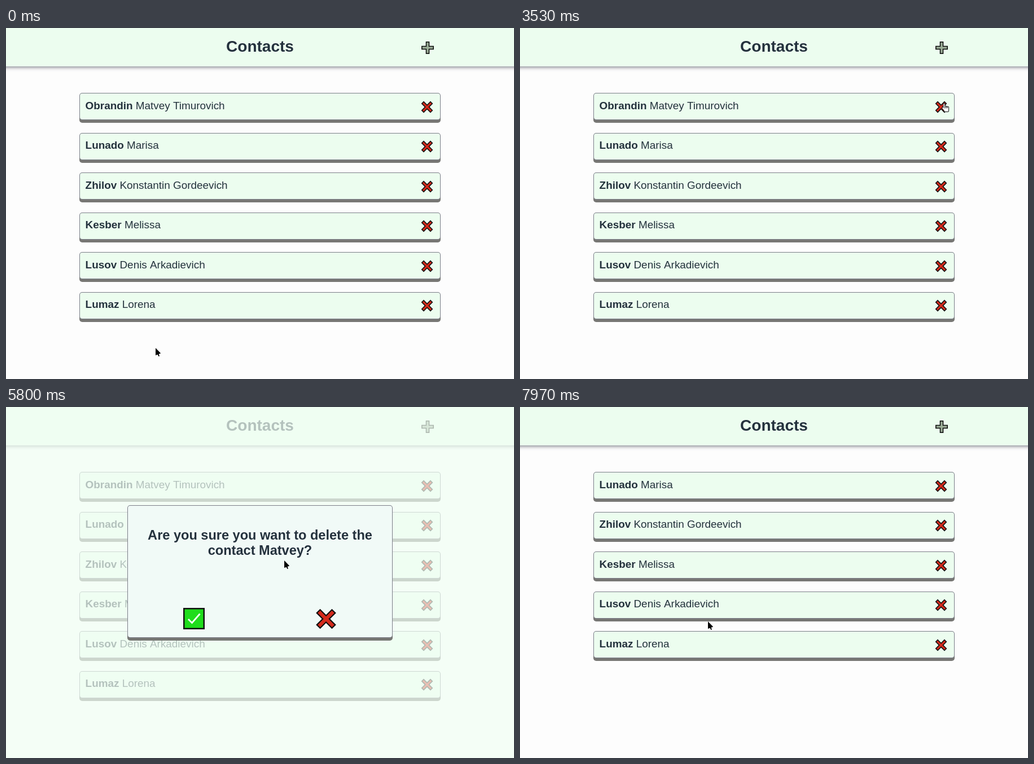
Write an HTML page with a canvas that moves like this. It is 900x622 px and loops after 8000 ms.

```html
<!DOCTYPE html>
<html lang="en">
<head>
<meta charset="utf-8">
<title>Contacts</title>
<style>
  html, body { margin: 0; width: 100%; height: 100%; overflow: hidden; background: #fdfdfd; }
  canvas { display: block; }
</style>
</head>
<body>
<canvas id="stage" width="900" height="622"></canvas>
<script>
const ctx = document.getElementById('stage').getContext('2d');
const W = 900, H = 622, LOOP = 8000, OPEN = 4450, CLOSE = 7100;
const INK = '#24313d', MINT = '#ecfdef', EDGE = '#7b7d88', SHADE = '#777774', RED = '#d42a1c';
const FONT = '"Liberation Sans", Arial, sans-serif';
const ROW = { x: 130, y: 115.2, w: 640, h: 53, pitch: 70.5 };
const DIALOG = { x: 215, y: 174, w: 470, h: 240 };

const contacts = [
  ['Obrandin', 'Matvey Timurovich'],
  ['Lunado', 'Marisa'],
  ['Zhilov', 'Konstantin Gordeevich'],
  ['Kesber', 'Melissa'],
  ['Lusov', 'Denis Arkadievich'],
  ['Lumaz', 'Lorena']
];

const home = { x: 265, y: 567 };
const moves = [
  { from: 1300, to: 2150, x: 489, y: 334 },
  { from: 2550, to: 3450, x: 749, y: 134 },
  { from: 4600, to: 5070, x: 632, y: 177 },
  { from: 5300, to: 6350, x: 333, y: 380 }
];

const rowTop = i => ROW.y + ROW.pitch * i;
const ease = p => p * p * (3 - 2 * p);

function pointerAt(t) {
  let { x, y } = home;
  for (const m of moves) {
    const p = ease(Math.min(1, Math.max(0, (t - m.from) / (m.to - m.from))));
    x += (m.x - x) * p;
    y += (m.y - y) * p;
  }
  return { x: Math.round(x), y: Math.round(y) };
}

function text(str, x, y, size, bold, align = 'left') {
  ctx.font = `${bold ? 'bold ' : ''}${size}px ${FONT}`;
  ctx.textAlign = align;
  ctx.fillStyle = INK;
  ctx.fillText(str, x, y);
  return ctx.measureText(str).width;
}

function box(x, y, w, h, r, fill) {
  ctx.beginPath();
  ctx.roundRect(x, y, w, h, r);
  ctx.fillStyle = fill;
  ctx.fill();
}

// Bordered box with a solid shadow below
function panel(x, y, w, h, depth, fill) {
  box(x, y + depth, w, h - depth, 5, SHADE);
  box(x, y, w, h - depth, 5, EDGE);
  box(x + 1, y + 1, w - 2, h - depth - 2, 4, fill);
}

function line(color, width, ...points) {
  ctx.beginPath();
  for (const [x, y] of points) ctx.lineTo(x, y);
  ctx.strokeStyle = color;
  ctx.lineWidth = width;
  ctx.stroke();
}

// Two outlined bars crossing at the centre
function cross(x, y, reach, thick, rim, fill, angle) {
  ctx.save();
  ctx.translate(x, y);
  ctx.rotate(angle);
  for (const [color, inset] of [['#111', 0], [fill, rim]]) {
    const r = reach - inset, width = thick - 2 * inset;
    line(color, width, [-r, 0], [r, 0]);
    line(color, width, [0, -r], [0, r]);
  }
  ctx.restore();
}

function drawHeader() {
  ctx.save();
  ctx.shadowColor = 'rgba(70, 72, 85, .65)';
  ctx.shadowBlur = 6;
  ctx.shadowOffsetY = 2;
  ctx.fillStyle = MINT;
  ctx.fillRect(-10, -10, W + 20, 78);
  ctx.restore();
  text('Contacts', W / 2, 42, 28, true, 'center');
  cross(747, 35, 11, 6.6, 1.6, '#9eb09a', 0);
}

function drawContact([last, first], i) {
  const y = Math.floor(rowTop(i));
  panel(ROW.x, Math.round(rowTop(i)), ROW.w, ROW.h, 5, MINT);
  const w = text(last + ' ', 140.6, y + 29, 18.9, true);
  text(first, 140.6 + w, y + 29, 18.9, false);
  cross(746, y + 25, 11.6, 6.2, 1.5, RED, Math.PI / 4);
}

function drawDialog() {
  const { x, y, w, h } = DIALOG;
  ctx.fillStyle = 'rgba(241, 255, 244, .7)';
  ctx.fillRect(0, 0, W, H);
  panel(x, y, w, h, 5, '#f1faf7');
  text('Are you sure you want to delete the', W / 2, 235, 23.55, true, 'center');
  text('contact Matvey?', W / 2, 262, 23.55, true, 'center');
  box(314, 356, 38, 38, 0, '#111');
  box(316.5, 358.5, 33, 33, 0, '#1fdd1c');
  line('#fff', 2.8, [323, 376], [329.5, 382.5], [343.5, 366.5]);
  cross(567, 375.5, 20, 10.5, 2.2, RED, Math.PI / 4);
}

function drawArrow() {
  line('#fff', 3.4, [3, 8], [6.3, 15]);
  line('#000', 2, [3, 8], [6.2, 14.6]);
  ctx.beginPath();
  ctx.lineTo(0, 0);
  ctx.lineTo(0, 13);
  ctx.lineTo(9.2, 9.4);
  ctx.fillStyle = '#000';
  ctx.fill();
}

// Index finger, three knuckles, thumb and palm: black rim first, white on top
function drawHand() {
  ctx.lineCap = 'round';
  for (const [color, rim] of [['#111', 1], ['#fff', 0]]) {
    const part = (x, y, w, h) =>
      box(x - rim, y - rim, w + 2 * rim, h + 2 * rim, 1 + rim, color);
    line(color, 1.6 + 2 * rim, [-.2, 7.5], [3, 11.5]);
    part(1.4, 0, 1.8, 11);
    for (let i = 0; i < 3; i++) part(3.8 + 2.3 * i, 4.6 + .6 * i, 1.7, 6);
    part(2.8, 8, 7.2, 6);
  }
  for (let i = 0; i < 3; i++) line('#111', .7, [3.5 + 2.3 * i, 5], [3.5 + 2.3 * i, 8]);
}

function isClickable({ x, y }, rows, dialog) {
  const inside = (l, t, w, h) => x >= l && x <= l + w && y >= t && y <= t + h;
  if (dialog) return inside(314, 356, 38, 38);
  return rows.some((_, i) => inside(ROW.x, rowTop(i), ROW.w, ROW.h));
}

function draw(t) {
  const dialog = t >= OPEN && t < CLOSE;
  const rows = t < CLOSE ? contacts : contacts.slice(1);
  const pointer = pointerAt(t);
  ctx.fillStyle = '#fdfdfd';
  ctx.fillRect(0, 0, W, H);
  drawHeader();
  rows.forEach(drawContact);
  if (dialog) drawDialog();
  ctx.save();
  ctx.translate(pointer.x, pointer.y);
  if (isClickable(pointer, rows, dialog)) drawHand();
  else drawArrow();
  ctx.restore();
}

const start = performance.now();
function tick() {
  draw((performance.now() - start) % LOOP);
  requestAnimationFrame(tick);
}
tick();
</script>
</body>
</html>
```
